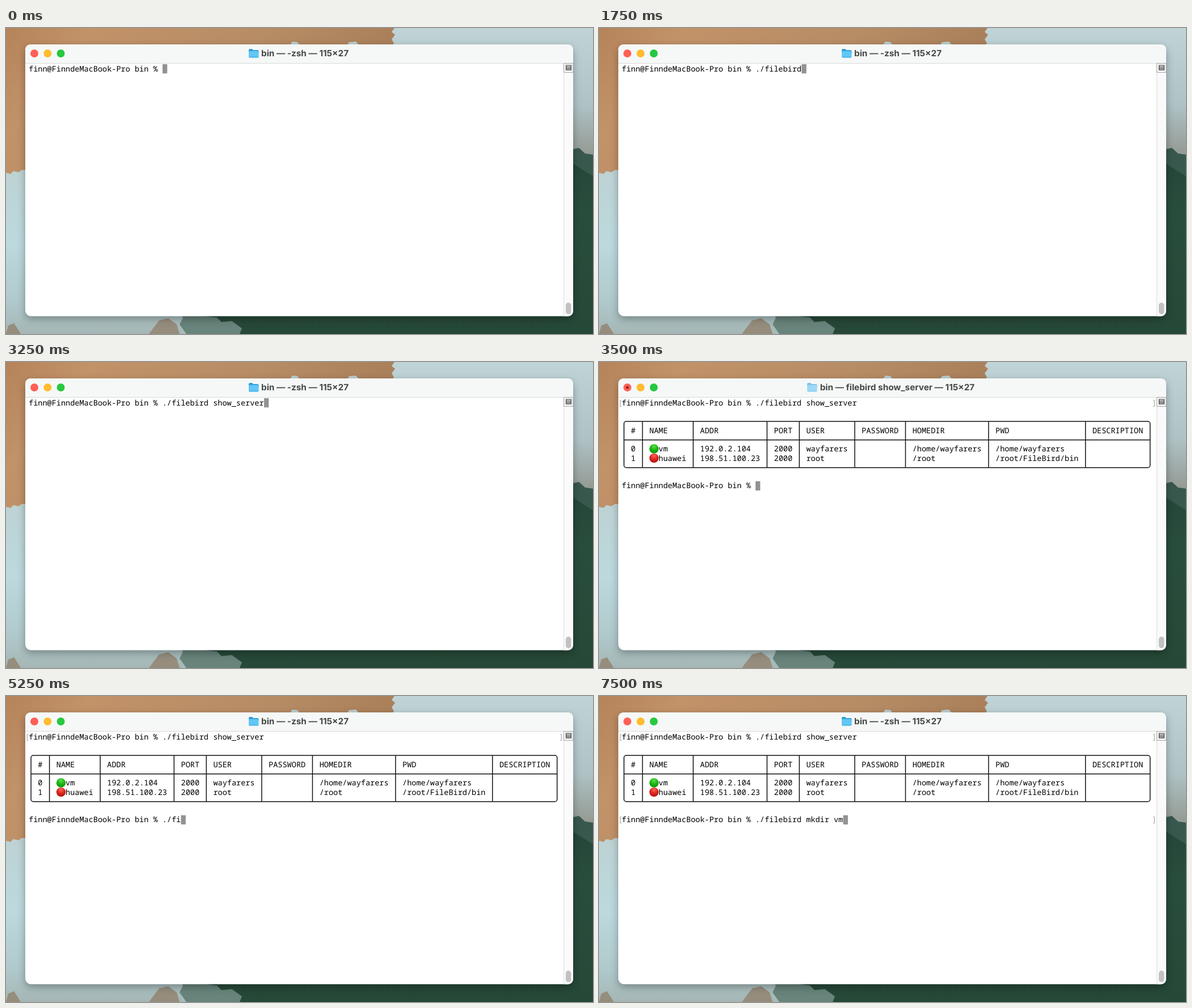
An HTML page that plays this animation: 1035x541 px, repeating every 8 s.

```html
<!DOCTYPE html>
<html lang="en">
<head>
<meta charset="utf-8">
<title>Terminal</title>
<style>
  html, body { margin: 0; width: 100%; height: 100%; overflow: hidden; }
  svg { display: block; width: 1035px; height: 541px; }
  text { white-space: pre; text-rendering: geometricPrecision; }
  .mono { font: 500 13.56px "Noto Sans Mono", "DejaVu Sans Mono", monospace; fill: #000; }
  .mono .mark { fill: #a9a9a9; font-weight: 400; }
  .title { font: 700 15.3px Inter, "Open Sans", sans-serif; fill: #454846; }
  .window { filter: drop-shadow(0 5px 7px rgba(0, 0, 0, .3)); }
  .rule { fill: none; stroke: #111; stroke-width: 1.5; }

  /* states that switch hard at fixed times */
  .idle, .busy, .output, .tabbed { animation: 8s step-end infinite; }
  .idle { animation-name: idle; }
  .busy { animation-name: busy; }
  .output { animation-name: output; }
  .tabbed { animation-name: tabbed; }
  @keyframes idle { 0%, 46.875% { visibility: visible; } 43.75% { visibility: hidden; } }
  @keyframes busy { 0%, 46.875% { visibility: hidden; } 43.75% { visibility: visible; } }
  @keyframes output { 0% { visibility: hidden; } 43.75%, 100% { visibility: visible; } }
  @keyframes tabbed { 0% { visibility: hidden; } 68.75%, 100% { visibility: visible; } }
</style>
</head>
<body>
<svg viewBox="0 0 1035 541">
  <defs>
    <linearGradient id="sand" x2="1" y2=".3">
      <stop stop-color="#b5835a"/><stop offset=".2" stop-color="#c29268"/>
      <stop offset=".6" stop-color="#b78d66"/><stop offset="1" stop-color="#a67c57"/>
    </linearGradient>
    <linearGradient id="surf" x2="0" y2="1">
      <stop stop-color="#bdd2d3"/><stop offset=".45" stop-color="#bcd9de"/>
      <stop offset=".8" stop-color="#b0c9cc"/><stop offset="1" stop-color="#a5b6b5"/>
    </linearGradient>
    <linearGradient id="spray" x2="0" y2="1">
      <stop stop-color="#c0d4d7"/><stop offset=".6" stop-color="#afc3c6"/>
      <stop offset="1" stop-color="#949a93"/>
    </linearGradient>
    <linearGradient id="sea" x2="0" y2="1">
      <stop offset=".4" stop-color="#24453a"/><stop offset=".6" stop-color="#294d3c"/>
      <stop offset="1" stop-color="#264837"/>
    </linearGradient>
    <radialGradient id="green" cx=".5" cy=".25" r=".8">
      <stop stop-color="#5be04c"/><stop offset=".45" stop-color="#1fb916"/><stop offset="1" stop-color="#078a08"/>
    </radialGradient>
    <radialGradient id="red" cx=".5" cy=".25" r=".8">
      <stop stop-color="#ff6a5c"/><stop offset=".45" stop-color="#e02a20"/><stop offset="1" stop-color="#a80c0c"/>
    </radialGradient>
    <g id="folder">
      <path d="M0 2.5Q0 .5 2 .5H6L8 2.5H15.5Q17.5 2.5 17.5 4.5V8H0Z" fill="#2f9dd6"/>
      <rect y="4.3" width="17.5" height="12" rx="1.8" fill="#62c6f6"/>
      <path d="M.5 14.8H17" stroke="#48aee2" stroke-width="1"/>
    </g>
  </defs>

  <!-- beach -->
  <rect width="1035" height="541" fill="url(#sea)"/>
  <path d="M0 0H700V120H60V262H0Z" fill="url(#sand)"/>
  <path d="M0 256L8 258 13 253 22 255 28 251 60 252V480H290L312 512 306 524 318 541H0Z" fill="url(#surf)"/>
  <path d="M300 500L350 509 372 512 380 520 398 518 416 531 412 541H310Z" fill="#a9bfbf" opacity=".5"/>
  <path d="M685 0L680 7 686 12 680 20 684 27 672 40H1000V215L1010 212 1021 222 1035 224V0Z" fill="url(#spray)"/>
  <path d="M500 31L505 24 514 25 518 31ZM601 31L605 25 617 24 623 31Z" fill="#bcced0"/>
  <path d="M252 541L260 530 270 517 286 513 301 524 306 541ZM0 541L4 526 14 522 20 531 26 541Z" fill="#93836f" opacity=".8"/>
  <path d="M1000 213L1010 212 1021 222 1035 224V262L1000 240Z" fill="#4d6a62" opacity=".5"/>

  <!-- window -->
  <rect class="window" x="34" y="29" width="966" height="480.5" rx="10" fill="#fff"/>
  <path d="M34 62V39Q34 29 44 29H990Q1000 29 1000 39V62Z" fill="#f5f8f7"/>
  <path d="M34 62.5H1000" stroke="#d8dbda"/>
  <circle cx="50" cy="45" r="7" fill="#ff5f57"/>
  <circle cx="73.3" cy="45" r="7" fill="#febc2e"/>
  <circle cx="96.6" cy="45" r="7" fill="#28c840"/>
  <g class="idle">
    <use href="#folder" x="428" y="36.5"/>
    <text class="title" x="450" y="50">bin — -zsh — 115×27</text>
  </g>
  <g class="busy">
    <circle cx="50" cy="45" r="2.3" fill="#8c1a10"/>
    <use href="#folder" x="367" y="36.5" opacity=".6"/>
    <text class="title" x="389.7" y="50">bin — filebird show_server — 115×27</text>
  </g>

  <!-- scroll bar -->
  <path d="M983 63H1000V499.5Q1000 509.5 990 509.5H983Z" fill="#fafafa"/>
  <path d="M983.5 63V509" stroke="#dedede"/>
  <path d="M983.5 62.5H1000V78.5H983.5Z" fill="#f4f4f4" stroke="#a5a5a5"/>
  <path d="M987.6 66.2H996.4V74H987.6ZM988 68.9H996M988 71.5H996" fill="none" stroke="#4b4b4b" stroke-width="1.3"/>
  <rect x="987" y="485.5" width="9.4" height="20.5" rx="4.7" fill="#c1c1c1"/>

  <rect id="cursor" y="64" width="8.3" height="16.3" fill="#929292"/>
  <g class="mono">
    <text id="line0" x="40"></text>
    <g id="output" class="output"></g>
    <g id="tabbed" class="tabbed"></g>
  </g>
</svg>
<script>
const CELL = 8.137, ROW = 16.31, LEFT = 40, LOOP = 8000;
const PROMPT = "finn@FinndeMacBook-Pro bin % ";
const COMMANDS = ["./filebird show_server", "./filebird mkdir vm"];

// [time, typed characters] for each prompt
const TYPING = [
  [[0, 0], [500, 2], [750, 5], [1000, 6], [1250, 7], [1500, 9], [1750, 10],
   [2250, 11], [2500, 15], [3000, 17], [3250, 22]],
  [[3500, 0], [5250, 4], [5500, 10], [6250, 11], [6500, 14], [6750, 15],
   [7000, 16], [7250, 17], [7500, 19]]
];

// [first column, heading, first server, second server]
const COLUMNS = [
  [0, "#", "0", "1"],
  [4, "NAME", "  vm", "  huawei"],
  [15, "ADDR", "192.0.2.104", "198.51.100.23"],
  [31, "PORT", "2000", "2000"],
  [38, "USER", "wayfarers", "root"],
  [50, "PASSWORD", "", ""],
  [61, "HOMEDIR", "/home/wayfarers", "/root"],
  [79, "PWD", "/home/wayfarers", "/root/FileBird/bin"],
  [100, "DESCRIPTION", "", ""]
];

const $ = id => document.getElementById(id);
const colX = col => LEFT + col * CELL;
const baseline = row => 76.7 + row * ROW;
const middle = row => 72.5 + row * ROW;

function add(parent, tag, attrs, content = "") {
  const el = document.createElementNS("http://www.w3.org/2000/svg", tag);
  for (const key in attrs) el.setAttribute(key, attrs[key]);
  el.textContent = content;
  parent.append(el);
  return el;
}

const write = (parent, col, row, content) =>
  add(parent, "text", { x: colX(col), y: baseline(row) }, content);

function addMarks(parent, row) {
  for (const [x, mark] of [[33.4, "["], [975, "]"]])
    add(parent, "text", { x, y: baseline(row), class: "mark" }, mark);
}

function buildTable(parent) {
  const x = colX(.5), y = middle(2), width = 114 * CELL, height = 5 * ROW;
  add(parent, "rect", { x, y, width, height, rx: 4, class: "rule" });
  add(parent, "path", { d: `M${x} ${middle(4)}h${width}`, class: "rule" });
  for (const [col, head, first, second] of COLUMNS) {
    if (col) add(parent, "path", { d: `M${colX(col + .5)} ${y}v${height}`, class: "rule" });
    write(parent, col + 2, 3, head);
    write(parent, col + 2, 5, first);
    write(parent, col + 2, 6, second);
  }
  ["green", "red"].forEach((name, i) =>
    add(parent, "circle", { cx: 97, cy: middle(5 + i) - .5, r: 8.2, fill: `url(#${name})` }));
}

addMarks($("output"), 0);
buildTable($("output"));
addMarks($("tabbed"), 9);
const lines = [$("line0"), write($("output"), 0, 9, PROMPT)];
lines[0].setAttribute("y", baseline(0));

const typedAt = (steps, t) => steps.reduce((n, [at, count]) => t >= at ? count : n, 0);

const start = performance.now();
function draw() {
  const t = (performance.now() - start) % LOOP;
  const counts = TYPING.map(steps => typedAt(steps, t));
  lines.forEach((line, i) => {
    const shown = PROMPT + COMMANDS[i].slice(0, counts[i]);
    if (line.textContent !== shown) line.textContent = shown;
  });
  const active = t < 3500 ? 0 : 1;
  $("cursor").setAttribute("x", colX(PROMPT.length + counts[active]));
  $("cursor").setAttribute("y", 64 + active * 9 * ROW);
  requestAnimationFrame(draw);
}
draw();
</script>
</body>
</html>
```
